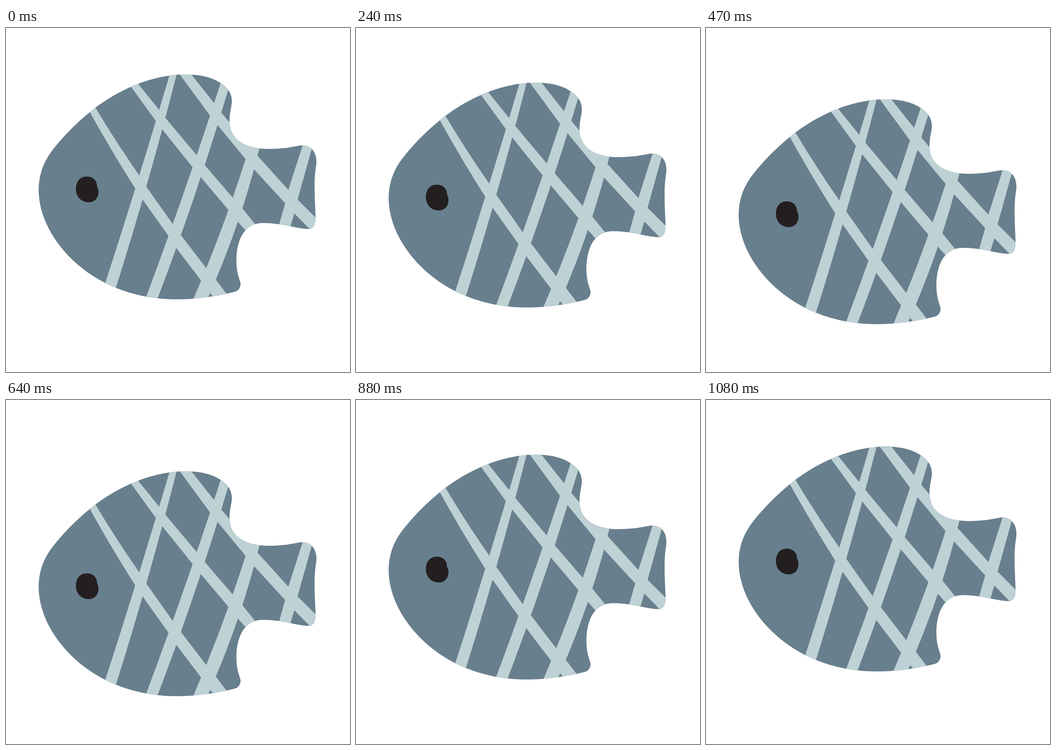
An HTML page without scripts for the animation above (1110 ms loop, 748x748 px).

```html
<!DOCTYPE html>
<html lang="en">
<head>
<meta charset="utf-8">
<title>Bobbing fish</title>
<style>
  @property --tick {
    syntax: "<number>";
    inherits: false;
    initial-value: 0;
  }

  html, body {
    margin: 0;
    width: 100%;
    height: 100%;
    overflow: hidden;
    background: #fff;
  }

  svg {
    display: block;
    width: 100%;
    height: 100%;
  }

  /* Down and up with cubic-bezier(.6, 0, .4, 1), solved in closed form
     so the eased motion can advance in 33 even ticks. */
  .fish {
    --turn: calc(var(--tick) * 2 / 33 - 1);
    --half: calc((0.5 - max(var(--turn), -1 * var(--turn))) / 3.2);
    --root: pow(var(--half) + sqrt(var(--half) * var(--half) + 0.001953125), 1 / 3);
    --s: calc(var(--root) - 0.125 / var(--root));
    --ease: calc(0.5 + 1.5 * var(--s) - 2 * var(--s) * var(--s) * var(--s));
    transform: translateY(calc(var(--ease) * 55.5px));
    animation: bob 1110ms steps(33) -5ms infinite;
  }

  @keyframes bob {
    from { --tick: 0; }
    to { --tick: 33; }
  }

  .skin { fill: #687f8d; }
  .net { fill: #bed1d5; }
  .eye { fill: #231f20; }
</style>
</head>
<body>
<svg viewBox="0 0 748 748">
  <defs>
    <path id="body" d="M71 352C71 322 80 295 97 271C119 241 152 207 187 179
      C245 133 320 101 390 101C424 101 450 108 467 120C486 132 492 147 491 162
      C490 174 486 185 486 203C486 239 514 263 572 263C600 263 622 259 636 256
      C662 251 676 269 675 293C674 305 671 315 671 345C671 375 673 395 673 411
      C673 430 668 437 657 437C635 437 600 424 559 424C517 424 501 463 501 505
      C501 538 510 548 510 557C510 565 505 572 496 574C455 584 413 590 371 590
      C329 590 283 583 239 565C140 525 71 435 71 352Z"/>
    <clipPath id="inside"><use href="#body"/></clipPath>
  </defs>

  <g class="fish">
    <use class="skin" href="#body"/>

    <g class="net" clip-path="url(#inside)">
      <!-- falling bands -->
      <path d="M171 164L183 184Q226 262 281 349L297 373L354 453L370 478L424 549L444 576L459 596
        L494 596L479 577L456 547L436 523L380 450L363 427L305 345L290 321Q236 243 195 174L183 154Z"/>
      <path d="M257 107L272 128L325 201L341 222L406 303L424 325L484 396L504 421L521 440L540 460
        L565 453L542 427L513 391L493 369L432 298L415 277L347 196L333 178L287 121L272 102Z"/>
      <path d="M363 81L378 101L444 191L460 211L521 285L539 307L607 381L627 403L660 437L680 457
        L693 432L673 412L634 373L614 352L547 278L486 205L468 184L453 164L403 101L387 81Z"/>

      <!-- rising bands -->
      <path d="M210 574L216 554Q289 329 355 104L361 82L376 82L371 101Q312 333 239 565L233 584Z"/>
      <path d="M297 606L305 584Q392 351 467 119L473 100L494 100L483 135Q416 361 330 587L322 608Z"/>
      <path d="M399 609L408 588Q478 425 528 262L534 242L557 242L551 262Q511.500 423.500 440 585L431 606Z"/>
      <path d="M588 447L594 427L607 381L614 352L645 255L651 236L672 236L665 262L634 373L627 403L618 433L612 453Z"/>
    </g>

    <path class="eye" d="M198 345C198 331 189 323 175 323C161 323 152 334 152 350
      C152 367 164 379 180 379C193 379 201 369 201 357C201 351 200 348 198 345Z"/>
  </g>
</svg>
</body>
</html>
```
